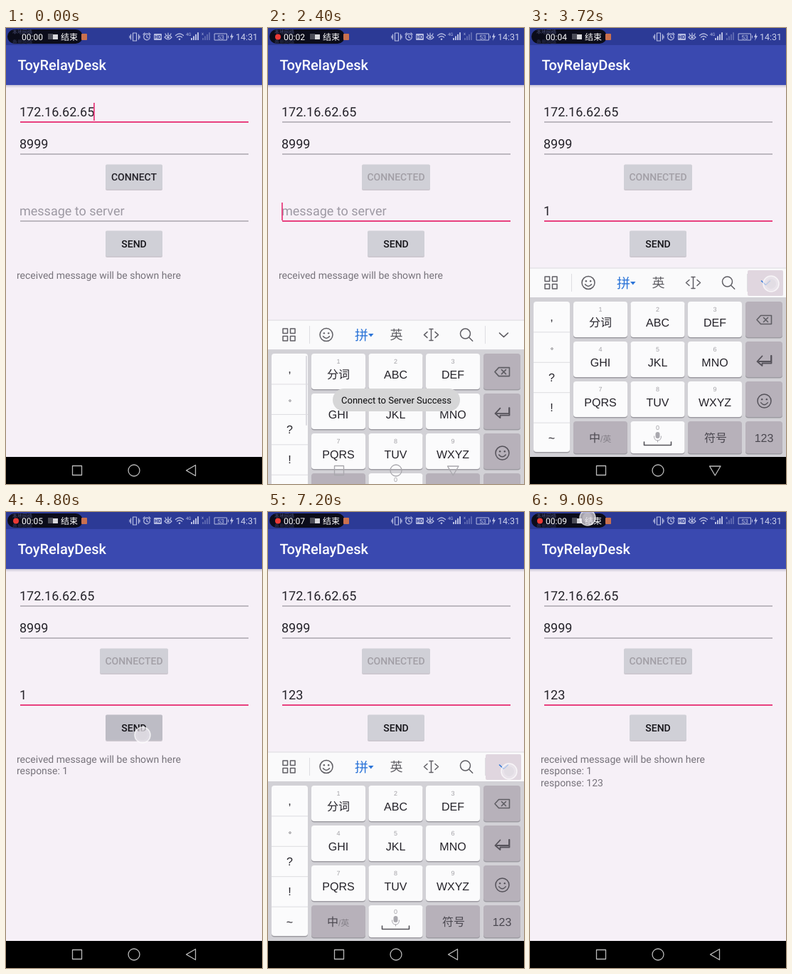
Write an HTML page that moves like this. It is 360 by 640 pixels and loops after 9.12 s.

```html
<!DOCTYPE html>
<html lang="en">
<head>
<meta charset="utf-8">
<title>Socket demo</title>
<style>
html, body { margin: 0; width: 100%; height: 100%; overflow: hidden; background: #f6f0f7; }
svg { display: block; width: 360px; height: 640px; font-family: Roboto, "Noto Sans CJK SC", "Noto Sans CJK", sans-serif; }
#board { font-family: "Liberation Sans", "Noto Sans CJK SC", "Noto Sans CJK", sans-serif; }
.line { fill: none; stroke-linecap: round; stroke-linejoin: round; }
text { white-space: pre; text-rendering: geometricPrecision; }
</style>
</head>
<body>
<svg id="stage" viewBox="0 0 360 640"></svg>
<script>
const LOOP = 9120;
const PINK = '#e8407f';
const INK = '#242229';

// Markup helpers
const rect = (x, y, w, h, fill, r = 0, more = '') =>
  `<rect x="${x}" y="${y}" width="${w}" height="${h}" rx="${r}" fill="${fill}" ${more}/>`;
const text = (x, y, size, fill, str, more = '') =>
  `<text x="${x}" y="${y}" font-size="${size}" fill="${fill}" ${more}>${str}</text>`;
const mid = (x, y, size, fill, str, more = '') =>
  text(x, y, size, fill, str, 'text-anchor="middle" ' + more);
const line = (d, color, w = 1.5, more = '') =>
  `<path class="line" d="${d}" stroke="${color}" stroke-width="${w}" ${more}/>`;
const ring = (x, y, r) => `M${x - r} ${y}a${r} ${r} 0 1 0 ${2 * r} 0a${r} ${r} 0 1 0 ${-2 * r} 0`;
const group = (id, body, more = '') => `<g id="${id}" ${more}>${body}</g>`;

const smiley = (x, y, r, c) =>
  line(ring(x, y, r) + `M${x - r * .5} ${y + r * .25}q${r * .5} ${r * .6} ${r} 0`, c) +
  `<circle cx="${x - r * .35}" cy="${y - r * .25}" r="1.2" fill="${c}"/>` +
  `<circle cx="${x + r * .35}" cy="${y - r * .25}" r="1.2" fill="${c}"/>`;

function statusBar() {
  const c = '#b7bde2';
  const bars = (x, color) => [0, 1, 2, 3].map(i =>
    rect(x + i * 3, 14 - i * 2.6, 2, 3 + i * 2.6, color)).join('');
  return rect(0, 0, 360, 24, '#2c3a96') +
    rect(2, 2, 106, 20, '#0b0c1a', 10) +
    text(9, 8, 7, '#4b5078', '本地网络') + text(9, 22, 7, '#32375c', '备用网络') +
    '<circle id="dot" cx="14" cy="12.500" r="4" fill="#ea3a35"/>' +
    text(22, 17, 12, '#fff', '00:00', 'id="timer"') +
    rect(59, 8, 7, 8, '#4c4d58') + rect(66, 9, 7, 7, '#d8d8dc') +
    text(77, 17, 12, '#fff', '结束') +
    rect(106, 8, 8, 9, '#c9704f', 1) +
    line('M178.500 7h5v11h-5zM175.500 9v7M186.500 9v7M174 11v3M188 11v3', c, 1.2) +
    line(ring(198, 12.5, 4.3) + 'M198 10v3l2 1M193 9l2-2M203 9l-2-2', c, 1.2) +
    rect(208, 8, 11, 9, c, 1) + mid(213.5, 15.2, 7, '#2c3a96', 'HD', 'font-weight="700"') +
    line('M223 13q5-6 10 0q-5 6-10 0M224 8l1 2M228 7v2M232 8l-1 2', c, 1.2) +
    `<circle cx="228" cy="13" r="1.800" fill="${c}"/>` +
    line('M238.500 10.500q5.500-5 11 0M240.500 13q3.500-3 7 0', c, 1.3) +
    `<circle cx="244" cy="15.800" r="1.300" fill="${c}"/>` +
    text(253, 10.5, 6, c, '4G') + bars(260, c) + text(275, 10, 6, c, 'x') + bars(276, '#5c67b0') +
    line('M293.500 8h17v9h-17zM312.500 11v3', c, 1) + mid(302, 15.7, 8.5, c, '53') +
    `<path d="M318 7l-3 6h2l-1 5 4-7h-2z" fill="${c}"/>` +
    text(323, 17, 12.5, '#ccd1ec', '14:31');
}

const button = (id, x, w, y, h, label, color) =>
  group(id, rect(x, y + 1.5, w, h, '#b9b6be', 2, 'opacity=".7"') +
    rect(x, y, w, h, '#d0d0d7', 2, 'class="face"') +
    mid(180, y + h / 2 + 5, 14, color, label, 'font-weight="500"'));

const field = (id, y, str) =>
  text(19, y - 7.5, 18, INK, str, `id="${id}Text"`) +
  rect(20, y, 321, 1, '#858189', 0, `id="${id}Line"`);

function form() {
  return rect(0, 80, 360, 2, '#cfcbdb') + rect(0, 82, 360, 2, '#e9e3ed') +
    rect(0, 24, 360, 56, '#3a49b0') +
    text(16.5, 59, 20, '#fff', 'ToyRelayDesk', 'font-weight="500"') +
    field('host', 131.5, '172.16.62.65') + field('port', 176.5, '8999') + field('msg', 270.5, '') +
    button('connect', 140, 80, 191.5, 35, 'CONNECT', INK) +
    button('connected', 132, 96, 191.5, 35, 'CONNECTED', '#a29fa6') +
    button('send', 140, 80, 284.5, 36, 'SEND', '#151419') +
    ['received message will be shown here', 'response: 1', 'response: 123']
      .map((s, i) => text(15, 352 + i * 16.4, 14, '#77737b', s, `id="reply${i}"`)).join('') +
    rect(0, 0, 1.8, 25, PINK, 0, 'id="caret"') +
    '<path id="handle" d="M30 270l6.500 4.500a10 10 0 1 1-13 0z" fill="#fb3c86"/>';
}

function keyboard() {
  const c = '#5f5e64', xs = [61, 141.5, 222], ys = [384, 440, 496, 552];
  const key = (x, y, w, h, fill, id) => rect(x, y + 1.5, w, h, '#9d9ba2', 4) +
    rect(x, y, w, h, fill, 4, id ? `id="${id}"` : '');
  let s = rect(0, 337, 360, 310, '#d2d1d6') + rect(0, 337, 360, 41, '#fafafb') +
    rect(0, 336.5, 360, 1, '#dddbe0') + rect(58, 345, 1, 25, '#dedde1') + rect(305, 345, 1, 25, '#dedde1') +
    rect(306, 340, 50, 36, '#e0d6df', 2, 'id="foldBack"') +
    line('M21 349h6.500v6.500h-6.500zM31.500 349h6.500v6.500h-6.500zM21 359.500h6.500v6.500h-6.500zM31.500 359.500h6.500v6.500h-6.500z', c) +
    smiley(82, 357.5, 9, c) +
    text(122, 364.5, 19, '#2b74d8', '拼', 'font-weight="500"') + '<path d="M141 356h7.500l-3.750 4.500z" fill="#2b74d8"/>' +
    mid(180.5, 364, 18, c, '英', 'font-weight="500"') +
    line('M224 353.500l-4.500 4 4.500 4M235 353.500l4.500 4-4.500 4M229.500 350v15M227 349.500h5M227 365.500h5', c) +
    line(ring(277.5, 356, 7) + 'M282.700 361.200l5 5', c) +
    line('M325.500 355l6 5.500 6-5.500', c, 1.5, 'id="fold"');

  s += key(5, 384, 51, 211, '#fbfbfc');
  [',', '。', '?', '!', '~'].forEach((ch, i) => {
    const y = 384 + i * 42.4;
    if (i) s += rect(5, y, 51, 1, '#dddce0');
    s += i === 1 ? text(29, y + 25, 10, INK, ch, 'font-weight="500"') : mid(30.5, y + 27, 16, INK, ch);
  });
  s += rect(53, 387, 2, 98, '#dcdbe0', 1, 'id="scroll"');

  ['分词', 'ABC', 'DEF', 'GHI', 'JKL', 'MNO', 'PQRS', 'TUV', 'WXYZ'].forEach((label, i) => {
    const x = xs[i % 3], y = ys[i / 3 | 0];
    s += key(x, y, 76, 50, '#fbfbfc', 'key' + (i + 1)) +
      mid(x + 38, y + 13.5, 9, '#a3a2a7', i + 1) + mid(x + 38, y + 34.5, 16, INK, label, 'font-weight="500"');
  });
  const dark = '#b7b1ba';
  ys.forEach((y, i) => s += key(303, y, 52, i < 3 ? 50 : 45, dark));
  s += key(61, 552, 76, 45, dark) + key(141.5, 552, 76, 45, '#fbfbfc') + key(222, 552, 76, 45, dark) +
    text(83, 581, 16, '#4b4850', '中', 'font-weight="500"') + text(99, 581, 12, '#858189', '/英') +
    mid(179.5, 563.5, 9, '#a3a2a7', '0') + rect(176.5, 567, 6, 9, '#a9a8ae', 3) +
    line('M174.500 573q0 6 5 6t5-6M179.500 579v2', '#a9a8ae', 1) + line('M160.500 581v4.500h38v-4.500', '#55545a', 1.6) +
    mid(261, 581, 16, '#4b4850', '符号', 'font-weight="500"') + mid(329, 580.5, 16, '#4b4850', '123') +
    line('M319 409.500l5.500-6h15v12h-15zM328.500 406.500l6 6M334.500 406.500l-6 6', c, 1.6) +
    line('M339 460v8h-17M326.500 460.500l-7 7.500 7 6v-3.500h13v-10.500', '#55525a', 1.8) +
    smiley(329.5, 523.5, 9.5, '#55525a');
  return s;
}

const nav = rect(0, 602, 360, 38, '#000', 0, 'id="navBack"') +
  group('navIcons', line('M93.500 614.500h13v13h-13z' + ring(180, 621, 8), 'currentColor', 1.3) +
    line('', 'currentColor', 1.3, 'id="back"'));

stage.innerHTML = form() + group('board', keyboard()) + nav +
  group('toast', rect(91, 506, 179, 32, '#d6d6d7', 16) +
    mid(180.5, 527, 13, '#0c0c0e', 'Connect to Server Success')) +
  statusBar() +
  group('touch', '<circle r="11" fill="#eeeaf0" fill-opacity=".75" stroke="#fff" stroke-opacity=".8" stroke-width="1.500"/>' +
    '<circle r="7" fill="#dcd8df" fill-opacity=".6"/>');

// Taps: start, end, x, y, pressed thing
const taps = [
  [360, 640, 186, 214, 'connect'],
  [2060, 2230, 105, 260],
  [2920, 3200, 126, 406, 'key1'],
  [3560, 3790, 339, 359, 'fold'],
  [4320, 4860, 192, 313, 'send'],
  [5290, 5420, 100, 260],
  [5740, 6060, 209, 406, 'key2'],
  [6260, 6500, 288, 406, 'key3'],
  [7040, 7260, 339, 364, 'fold'],
  [7720, 8040, 192, 310, 'send'],
  [8860, 9200, 81, 8]
];
// Caret restarts: time, x, y
const carets = [[0, 123, 105], [2200, 19, 245], [3200, 29, 245], [5400, 29, 245], [6060, 39.5, 245], [6500, 49, 245]];
const typed = [[3200, '1'], [6060, '12'], [6500, '123']];
// Keyboard: opens at, closes at
const sessions = [[2250, 3730], [5420, 7190]];

const $ = id => document.getElementById(id);
const clamp = v => Math.max(0, Math.min(1, v));
const last = (list, t) => list.filter(e => e[0] <= t).pop();
const show = (id, on) => $(id).style.opacity = +on;
const set = (id, name, v) => $(id).setAttribute(name, v);

function underline(id, y, focus) {
  set(id, 'y', focus ? y - 0.5 : y);
  set(id, 'height', focus ? 2 : 1);
  set(id, 'fill', focus ? PINK : '#858189');
}

function draw(t) {
  const clock = t + 500;
  timer.textContent = '00:' + String(clock / 1000 | 0).padStart(2, '0');
  show('dot', t > 300 && clock % 1000 >= 290);

  const onMsg = t >= 2200;
  underline('hostLine', 131.5, !onMsg);
  underline('msgLine', 270.5, onMsg);
  const entry = last(typed, t);
  $('msgText').textContent = entry ? entry[1] : 'message to server';
  set('msgText', 'fill', entry ? INK : '#9d99a3');

  const [from, x, y] = last(carets, t);
  set('caret', 'x', x);
  set('caret', 'y', y);
  show('caret', (t - from) % 1000 < 500);
  show('handle', t >= 5400 && t < 6060);

  show('connect', t < 760);
  show('connected', t >= 760);
  show('reply1', t >= 4560);
  show('reply2', t >= 7960);
  show('toast', clamp((t - 1120) / 200) * clamp((3300 - t) / 250));

  // The back arrow turns at once, the keyboard leaves a moment later
  const open = sessions.some(([a, b]) => t >= a && t < b);
  let up = 0;
  for (const [a, b] of sessions) {
    const rise = 1 - (1 - clamp((t - a) / 400)) ** 3;
    const fall = clamp((t - b - 20) / 80) ** 2;
    up = Math.max(up, rise - fall);
  }
  const sliding = up > 0 && up < 1;
  set('board', 'transform', `translate(0 ${(1 - up) * 303})`);
  show('board', up > 0);
  show('scroll', sliding);
  show('navBack', !sliding);
  $('navIcons').style.color = sliding ? '#a9a8ad' : '#b9b9b9';
  set('back', 'd', open ? 'M252.500 615h15.500l-7.750 13z' : 'M266.500 613.500v15l-13-7.500z');

  const tap = taps.find(p => t >= p[0] && t < p[1] + 140);
  const held = tap && t < tap[1] ? tap[4] : '';
  show('touch', tap ? 0.9 * clamp((t - tap[0]) / 60) * clamp((tap[1] + 140 - t) / 140) : 0);
  if (tap) set('touch', 'transform', `translate(${tap[2]} ${tap[3]})`);
  for (const id of ['key1', 'key2', 'key3']) set(id, 'fill', held === id ? '#b4b4be' : '#fbfbfc');
  for (const id of ['connect', 'send'])
    $(id).querySelector('.face').setAttribute('fill', held === id ? '#bdbcc5' : '#d0d0d7');
  show('foldBack', held === 'fold');
  set('fold', 'stroke', held === 'fold' ? '#2b74d8' : '#5f5e64');
}

const start = performance.now();
function frame() {
  draw((performance.now() - start) % LOOP);
  requestAnimationFrame(frame);
}
frame();
</script>
</body>
</html>
```
